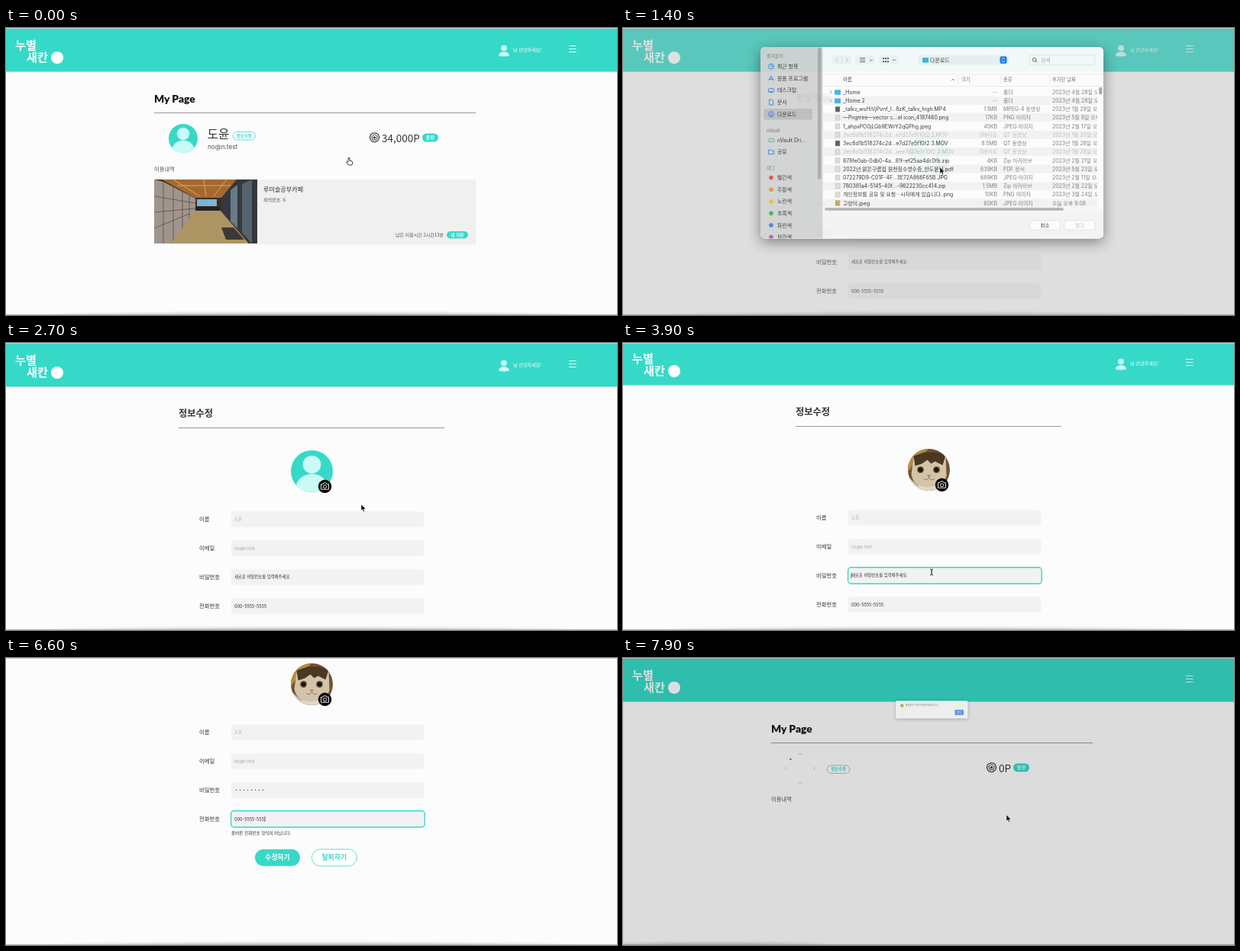
An HTML page that plays this animation: 800 by 377 pixels, repeating every 8000 ms.

```html
<!DOCTYPE html>
<html lang="ko">
<head>
<meta charset="utf-8">
<style>
html, body { margin: 0; width: 100%; height: 100%; overflow: hidden; background: #fcfcfc; }
svg { display: block; width: 800px; height: 377px; }
text { font-family: "Noto Sans CJK KR", sans-serif; white-space: pre; }
.latin { font-family: Inter, "Noto Sans CJK KR", sans-serif; }
.title { font-family: Lato, sans-serif; }
</style>
</head>
<body>
<svg id="stage" viewBox="0 0 800 377"></svg>
<script>
const TEAL = '#36d9c8', PALE = '#c9faf6', INK = '#333', LOOP = 8000;
const PHONE = '000-5555-5555', EMAIL = 'no@n.test', NAME = '도윤';

const clamp = (v, lo = 0, hi = 1) => Math.min(hi, Math.max(lo, v));
const progress = (t, from, to) => clamp((t - from) / (to - from));
const ease = p => p * p * (3 - 2 * p);

// Shape helpers; text is placed by its visual middle.
const text = (x, y, s, size, fill = INK, attrs = '') =>
  `<text x="${x}" y="${y + size * .37}" font-size="${size}" fill="${fill}" ${attrs}>${s}</text>`;
const rect = (x, y, w, h, fill, r = 0, attrs = '') =>
  `<rect x="${x}" y="${y}" width="${w}" height="${h}" rx="${r}" fill="${fill}" ${attrs}/>`;
const circle = (x, y, r, fill, attrs = '') => `<circle cx="${x}" cy="${y}" r="${r}" fill="${fill}" ${attrs}/>`;
const path = (d, fill, attrs = '') => `<path d="${d}" fill="${fill}" ${attrs}/>`;
const line = (d, color, w = 1) => path(d, 'none', `stroke="${color}" stroke-width="${w}"`);
const group = (attrs, body) => `<g ${attrs}>${body}</g>`;
const MID = 'text-anchor="middle"', END = 'text-anchor="end"', BOLD = 'font-weight="700"', MEDIUM = 'font-weight="500"';
const LATIN = 'class="latin"';

const pill = (x, y, w, h, label, size, filled) =>
  rect(x, y, w, h, filled ? TEAL : '#fff', h / 2, filled ? '' : `stroke="${TEAL}" stroke-width=".8"`) +
  text(x + w / 2, y + h / 2, label, size, filled ? '#fff' : TEAL, `${MID} ${BOLD}`);

const person = (x, y, r) => group(`transform="translate(${x} ${y}) scale(${r})"`,
  circle(0, 0, 1, TEAL) + circle(0, -.32, .43, PALE) +
  path('M-.75 .66C-.55-.05 .55-.05 .75 .66A1 1 0 0 1-.75 .66Z', PALE));

const cat = (x, y) => group(`transform="translate(${x} ${y})" clip-path="url(#round)"`,
  rect(-28, -28, 56, 56, '#6f5330') + path('M-28-28H0L-20-8-28 4Z', '#b88d3e') +
  path('M-20-16L-9-11Q2-15 11-11L22-19 23 8Q18 24 0 27-20 23-23 6Z', '#d3c4a9') +
  path('M-20-18L-6-23H10L22-19 18-6 8-11 3-8-2-13-9-8-18-5Z', '#493823') +
  path('M-28 8L-15 21 0 23 17 19 28 12V28H-28Z', '#e0d8ca') +
  circle(-11, 0, 4.5, '#6b5a34') + circle(10, 0, 4.5, '#6b5a34') +
  circle(-11, 0, 3, '#17140f') + circle(10, 0, 3, '#17140f') +
  path('M-3 7H3L0 10Z', '#b57866') + line('M0 10Q-3 15-7 12M0 10Q3 15 7 12', '#756149', .8));

const camera = (x, y) => group(`transform="translate(${x} ${y})"`, circle(0, 0, 8.7, '#000') +
  path('M-5-3H-2.5L-1.5-4.5H1.5L2.5-3H5V4H-5Z', 'none', 'stroke="#fff" stroke-width=".9" stroke-linejoin="round"') +
  circle(0, .4, 2.1, 'none', 'stroke="#fff" stroke-width=".9"'));

const header = signedIn => rect(0, 0, 800, 57.5, TEAL) +
  text(12, 22.5, '누별', 15.2, '#fff', BOLD) + text(27, 38.5, '새칸', 15.2, '#fff', BOLD) + circle(67, 39, 8, '#fff') +
  (signedIn ? circle(652, 26.3, 3.9, PALE) + path('M645 36.5C645 29.5 659 29.5 659 36.5Q652 38.5 645 36.5Z', PALE) +
    text(664, 29, '님 안녕하세요!', 6.1, '#fff', MEDIUM) : '') +
  line('M737 23.5H746.5M737 27.5H746.5M737 31.5H746.5', '#fff', .9);

const photo = () => group('transform="translate(194 199)"',
  rect(0, 0, 135, 84, '#3a2f28') + path('M10 0H108L88 24H53Z', '#a5682f') +
  line('M25 0L60 22M65 0L68 22M95 0L78 22M30 8H100', '#e1a95a', 1) +
  path('M0 0L12 3 54 25V48L22 84H0Z', '#a0958d') +
  line('M0 22L54 31M0 43L54 38M0 64L46 45M12 3V84M25 10V80M37 16V66M46 21V56', '#5a4d48', .8) +
  path('M54 41H87L124 84H22Z', '#ad9563') + path('M56 26H82V35H56Z', '#7db4d4') + path('M54 36H86V41H54Z', '#27211e') +
  path('M135 0H108L88 24V42L124 84H135Z', '#35383e') + path('M100 14L109 7V64L100 55Z', '#687b89') +
  path('M115 6L128 0V84L115 70Z', '#56636e') + path('M88 63H104L118 79H94Z', '#3c3a36'));

const badge = group('transform="translate(482.5 143.7)"',
  circle(0, 0, 6, 'none', 'stroke="#222" stroke-width="1.1"') +
  path('M0-4L3.8-1.2 2.4 3.2H-2.4L-3.8-1.2Z', 'none', 'stroke="#222" stroke-width=".9"') +
  path('M0-2.2L.7-.7 2.1-.6 1 .5 1.3 2 0 1.2-1.3 2-1 .5-2.1-.6-.7-.7Z', '#222'));

const myPage = loaded => header(loaded) +
  text(194, 92.5, 'My Page', 13.8, '#111', `class="title" font-weight="900"`) + line('M194 111.5H615', '#999') +
  badge + text(492, 145, loaded ? '34,000P' : '0P', 13.5) +
  pill(loaded ? 545 : 511, 138.5, 21, 11, '충전', 6.2, true) +
  pill(loaded ? 297 : 267.3, loaded ? 136.5 : 141, 29.5, 10.5, '정보수정', 5.4) +
  text(194, 185.5, '이용내역', 7.3, '#555') +
  (loaded
    ? person(232, 145, 19) + text(263.5, 139.5, NAME, 15.8) + text(264, 155.5, EMAIL, 8.2, '#555', LATIN) +
      rect(194, 199, 421, 85.5, '#f0f0f0') + photo() +
      text(337, 212.5, '루미솔공부카페', 8.1, INK, MEDIUM) + text(337, 225.5, '좌석번호: 6', 6.1, '#555') +
      text(573, 272, '남은 이용시간 2시간13분', 6, '#555', END) + pill(577, 267, 28, 9.5, '내 리뷰', 5.6, true)
    : line('M229.5 126H234.5M229.5 164H234.5M213 143V147M250.5 143V147', '#aaa', .6) + path('M217.5 133.5L219.5 131.5 221 133.5Z', '#444'));

function field(y, label, body, focused) {
  return text(253, y, label, 7.3) + rect(295, y - 10.3, 252.5, 20.6, '#f2f2f2', 3.5) +
    (focused ? rect(294.6, y - 10.8, 253.6, 21.6, 'none', 4, `stroke="${TEAL}" stroke-width="1.4"`) : '') + body;
}
const caret = (x, y) => line(`M${x} ${y - 3.5}V${y + 3.5}`, '#222', .7);

function editPage(t) {
  const scroll = t < 3700 ? 0 : 2 + 132 * ease(progress(t, 4900, 5500));
  const secret = clamp(Math.floor((t - 4000) / 90), 0, 8);
  const digits = clamp(Math.floor((t - 5700) / 90), 0, 11);
  const typed = PHONE.slice(0, digits + (digits > 3) + (digits > 7));
  const onSecret = t >= 3800 && t < 5600, onPhone = t >= 5600;
  const dots = Array.from({ length: secret }, (_, i) => circle(301.5 + i * 5, 307.5, .7, '#444')).join('');
  return group(`transform="translate(0 ${-scroll})"`, header(true) +
    text(226, 92.5, '정보수정', 12.2, INK, BOLD) + line('M226 111.5H574', '#999') +
    (t < 3100 ? person(400.5, 168.5, 27.5) : cat(400.5, 168.5)) + camera(417.5, 188.3) +
    field(231.5, '이름', text(299, 231.5, NAME, 5.4, '#aaa')) +
    field(269.5, '이메일', text(299, 269.5, EMAIL, 5.6, '#aaa', LATIN)) +
    field(307.5, '비밀번호', (secret ? dots : text(299, 307.5, '새로운 비밀번호를 입력해주세요.', 5.4)) +
      (onSecret ? caret(299 + secret * 5, 307.5) : ''), onSecret) +
    (secret && secret < 8 ? text(295, 325.5, '올바른 비밀번호 형식이 아닙니다.', 5.6) : '') +
    field(345.5, '전화번호', text(299, 345.5, typed || PHONE, 5.6, INK, LATIN) +
      (onPhone ? caret(299 + typed.length * 3.33, 345.5) : ''), onPhone) +
    (digits && digits < 11 ? text(295, 363.5, '올바른 전화번호 형식이 아닙니다.', 5.6) : '') +
    pill(326, 385.2, 59, 22, '수정하기', 8.8, true) + pill(400.4, 385.2, 59, 22, '탈퇴하기', 8.8));
}

const FILES = `_Home|--|폴더|4월 28
_Home 2|--|폴더|4월 28
_talkv_wsHiVjPvnf_l...8zK_talkv_high.MP4|1.1MB|MPEG-4 동영상|1월 29
—Pngtree—vector c...el icon_4187460.png|17KB|PNG 이미지|5월 9
1_ahpxPO0jLGb9EWrY2qQPhg.jpeg|45KB|JPEG 이미지|2월 17
3ec6d1b518274c2d...e7d27e5f10f2 2.MOV|0바이트|QT 동영상|1월 28
3ec6d1b518274c2d...e7d27e5f10f2 3.MOV|8.5MB|QT 동영상|1월 28
3ec6d1b518274c2d...aee7d27e5f10f2 2.MOV|0바이트|QT 동영상|1월 28
878fe0ab-0db0-4a...81f-ef25aa4dc0fb.zip|4KB|Zip 아카이브|2월 21
2022년 맑은구름집 원천징수영수증_한도윤님.pdf|639KB|PDF 문서|5월 23
072279D9-C01F-4F...3E72A866F65B.JPG|689KB|JPEG 이미지|2월 11
780381a4-5145-40f...-9622230cc414.zip|1.5MB|Zip 아카이브|2월 22
개인정보를 공유 및 요청···시자에게 있습니다..png|10KB|PNG 이미지|3월 24
고양이.jpeg|60KB|JPEG 이미지|오늘`.split('\n').map(row => row.split('|'));

function fileRow([name, size, kind, date], i, selected) {
  const y = 96.2 + i * 11.22, empty = size === '0바이트';
  const fill = selected ? '#fff' : empty ? '#bbb' : '#2b2b2b', soft = selected ? '#fff' : empty ? '#bbb' : '#777';
  const when = date === '오늘' ? '오늘 오후 9:08' : `2023년 ${date}일 오후`;
  const icon = i < 2
    ? line(`M271 ${y - 2}L273 ${y} 271 ${y + 2}`, '#777', .8) + rect(277, y - 3, 8, 6.5, '#35b5e5', 1)
    : rect(278, y - 3.5, 6, 7, ['#ddd', '#555', '#c9a54c'][i === 13 ? 2 : i === 2 || i === 6 ? 1 : 0], .5, 'stroke="#aaa" stroke-width=".4"');
  return rect(262, y - 5.6, 359, 11.2, selected ? '#0b5ed7' : i % 2 ? '#f4f4f4' : '#fff') + icon +
    text(288, y, name, 6.9, fill, LATIN) + text(490, y, size, 6.9, soft, `${LATIN} ${END}`) +
    text(498, y, kind, 6.9, soft, LATIN) + text(562, y, when, 6.9, soft, LATIN);
}

function sidebar(t) {
  const blue = '#1e7be0', heading = (y, s) => text(188, y, s, 5.9, '#777', `${LATIN} ${MEDIUM}`);
  const places = ['최근 항목', '응용 프로그램', '데스크탑', '문서', '다운로드', 'nVault Dri...', '공유'];
  const tags = [['빨간색', '#d9534a'], ['주황색', '#e8923a'], ['노란색', '#e6bd35'], ['초록색', '#43b64b'], ['파란색', '#3b84e0'], ['보라색', '#a65cc5']];
  const icons = [circle(0, 0, 3.5, 'none') + path('M0-2V0H2', 'none'), path('M-3 3L0-3 3 3M-3.5 1H3.5', 'none'),
    rect(-3.5, -2.5, 7, 5, 'none', 1) + path('M-2 1.5H2', 'none'), path('M-2.5-3.5H1L2.5-2V3.5H-2.5Z', 'none'),
    circle(0, 0, 3.5, 'none') + path('M0-2V2M-1.5 .5L0 2 1.5 .5', 'none'),
    path('M-3 2.5A2 2 0 0 1-2-1 2.5 2.5 0 0 1 2-1 1.8 1.8 0 0 1 3 2.5Z', 'none'), path('M-3.5-2.5H-.5L.5-1.5H3.5V3H-3.5Z', 'none')];
  const tagTop = t < 1500 ? 196 : 214;
  return rect(180, 37, 81.5, 251, '#d3d4d4') + rect(184, 118, 64, 14.5, '#bcbdbd', 3) +
    heading(49, '즐겨찾기') + heading(146.7, 'nVault') + (t < 1500 ? '' : heading(195.5, '위치')) + heading(tagTop, '태그') +
    places.map((s, i) => {
      const y = i < 5 ? 62.5 + i * 15.7 : 159 + (i - 5) * 15.7;
      return group(`transform="translate(194 ${y})" stroke="${i === 5 ? '#35a8a5' : blue}" stroke-width=".9"`, icons[i]) +
        text(202, y, s, 6.9, '#2b2b2b', LATIN);
    }).join('') +
    tags.map(([s, c], i) => circle(194, tagTop + 12.6 + i * 15.6, 2.8, c) + text(202, tagTop + 12.6 + i * 15.6, s, 6.9)).join('') +
    rect(255, 38, 4.5, 173, '#aaa', 2.2);
}

function fileDialog(t, opening, opacity) {
  const chevron = x => line(`M${x - 1.8} 53.3L${x} 55.1 ${x + 1.8} 53.3`, '#555', .9);
  const frame = x => rect(x, 48, 26, 12, '#f7f7f7', 3);
  const button = (x, s, fill) => rect(x, 265, 40, 12.3, '#fff', 3, 'stroke="#ddd" stroke-width=".7"') + text(x + 20, 271.3, s, 6.6, fill, MID);
  return group(`opacity="${opacity}" transform="translate(0 ${-25 * (1 - opening)})"`,
    rect(180, 37, 449, 251.5, '#fff', 6, 'style="filter:drop-shadow(0 5px 9px #0007)"') +
    group('clip-path="url(#window)"', rect(180, 37, 449, 252, '#fff') + sidebar(t) +
      frame(273) + line('M281 51.5L278.5 54 281 56.5M292 51.5L294.5 54 292 56.5', '#bbb') + line('M286.5 50V58', '#ddd', .6) +
      frame(304) + line('M310 51.5H317M310 54H317M310 56.5H317', '#555', .9) + chevron(325) +
      frame(335) + path('M340 51h2v2h-2zm3 0h2v2h-2zm3 0h2v2h-2zm-6 4h2v2h-2zm3 0h2v2h-2zm3 0h2v2h-2z', '#555') + chevron(355) +
      rect(387, 47.7, 118, 12.5, '#f3f3f3', 3) + rect(392, 51, 8, 6.5, '#35b5e5', 1) + text(402, 54, '다운로드', 7, INK) +
      rect(493.5, 49.3, 9, 9.5, '#1878f0', 2) + line('M496.2 53L498 51.2 499.8 53M496.2 55L498 56.8 499.8 55', '#fff', .9) +
      rect(532, 47.7, 86, 12.5, '#fff', 3, 'stroke="#ddd" stroke-width=".7"') +
      circle(538.5, 53.5, 2.3, 'none', 'stroke="#555" stroke-width=".9"') + line('M540.2 55.2L542.3 57.3', '#555') + text(547, 54, '검색', 6.9, '#aaa') +
      line('M262 73H629M262 88.3H629', '#e5e5e5', .7) + line('M439 75V86M495 75V86M559 75V86', '#ddd', .7) +
      text(288, 79.7, '이름', 6.3, INK, MEDIUM) + text(443, 79.7, '크기', 6.3, '#666') + text(498, 79.7, '종류', 6.3, '#666') +
      text(562, 79.7, '추가된 날짜', 6.3, '#666') + line('M430 81L432 79 434 81', '#666', .8) +
      group('clip-path="url(#list)"', FILES.map((f, i) => fileRow(f, i, i === 13 && t >= 2000)).join('')) +
      rect(623, 89.5, 4.5, 10, '#aaa', 2.2) + rect(262, 247, 367, 6.5, '#fafafa') + rect(264, 248, 313, 4, '#b5b5b5', 2) +
      rect(262, 253.5, 367, 36, '#f6f6f6') + button(532.5, '취소', INK) + button(578, '열기', '#bbb')));
}

const alertBox = p => group(`opacity="${.75 * p}" transform="translate(404 68) scale(${.6 + .4 * p}) translate(-404 -68)"`,
  rect(357, 56, 94.5, 23.5, '#f4f4f4', 1.5, 'style="filter:drop-shadow(0 1px 2px #0005)"') + circle(365.3, 62.5, 2.3, '#6fb544') +
  text(369.5, 62.3, '회원정보 수정이 완료되었습니다.', 3.2, '#555') +
  rect(434.5, 68, 11.5, 7, '#2477d8', 1) + text(440.2, 71.5, '확인', 4.2, '#fff', MID));

// Pointer stops: time, x, y.
const STOPS = [[0, 449, 171], [400, 311, 141], [500, 311, 141], [900, 398, 181], [1100, 415, 183], [1400, 415, 183], [1900, 327.5, 244],
  [2100, 327.5, 244], [2400, 597, 269], [2700, 465, 212], [3000, 445, 235], [3700, 404, 301], [4900, 404, 301], [5600, 404, 211],
  [6800, 404, 211], [7300, 357, 260], [7600, 357, 260], [7900, 502, 206]];

function pointer(t) {
  if ((t >= 4100 && t < 4900) || (t >= 5700 && t < 6800)) return '';
  const i = Math.max(1, STOPS.findIndex(s => s[0] >= t));
  const [a, b] = [STOPS[i - 1], STOPS[i]], p = ease(progress(t, a[0], b[0]));
  const x = a[1] + (b[1] - a[1]) * p, y = a[2] + (b[2] - a[2]) * p;
  const hand = t < 600 || (t >= 1000 && t < 1300) || (t >= 7200 && t < 7700);
  const beam = (t >= 3600 && t < 4900) || (t >= 5400 && t < 6900);
  const shape = beam ? line('M-2-4Q0-4 0-2.5Q0-4 2-4M0-3V3M-2 4Q0 4 0 2.5Q0 4 2 4M-1 0H1', '#222', .9)
    : hand ? path('M-1 0Q0-1.5 1 0V3.2L4 4Q5 4.5 4.7 6.3L4 9H-.5L-3.3 5.3Q-3.2 4-1 5Z', '#fff', 'stroke="#222" stroke-width=".9" stroke-linejoin="round"')
    : path('M0 0V8.2L1.9 6.5 3.2 9.5 4.6 8.9 3.3 6H6Z', '#000', 'stroke="#fff" stroke-width=".5"');
  return group(`transform="translate(${x} ${y})"`, shape);
}

const DEFS = `<defs><clipPath id="round">${circle(0, 0, 27.5, '#000')}</clipPath>
  <clipPath id="window">${rect(180, 37, 449, 251.5, '#000', 6)}</clipPath>
  <clipPath id="list">${rect(262, 89, 359, 158.5, '#000')}</clipPath></defs>`;

function scene(t) {
  const opening = progress(t, 1270, 1520), closing = progress(t, 2400, 2600);
  const dim = .64 * opening * (1 - closing), shown = clamp(opening * 1.75) * (1 - closing);
  const notice = progress(t, 7700, 7900), done = t >= 7700;
  return DEFS + rect(0, 0, 800, 377, '#fcfcfc') +
    (t < 500 ? myPage(true) : done ? myPage(false) : editPage(t)) +
    `<ellipse cx="${done ? 120 : 400}" cy="379" rx="${done ? 150 : 340}" ry="4" opacity=".3" style="filter:blur(2px)"/>` +
    rect(0, 0, 800, 1, '#c9cccc') + rect(0, 376, 800, 1, '#b8b8b8') +
    (dim ? rect(0, 0, 800, 377, '#a3a3a3', 0, `opacity="${dim}"`) : '') +
    (shown ? fileDialog(t, opening, shown) : '') +
    (notice ? rect(0, 0, 800, 377, '#000', 0, `opacity="${.13 * notice}"`) + alertBox(notice) : '') + pointer(t);
}

const stage = document.getElementById('stage');
let last = -1;
function tick() {
  const t = Math.floor(performance.now() % LOOP / 100) * 100;
  if (t !== last) stage.innerHTML = scene(last = t);
  requestAnimationFrame(tick);
}
tick();
</script>
</body>
</html>
```
